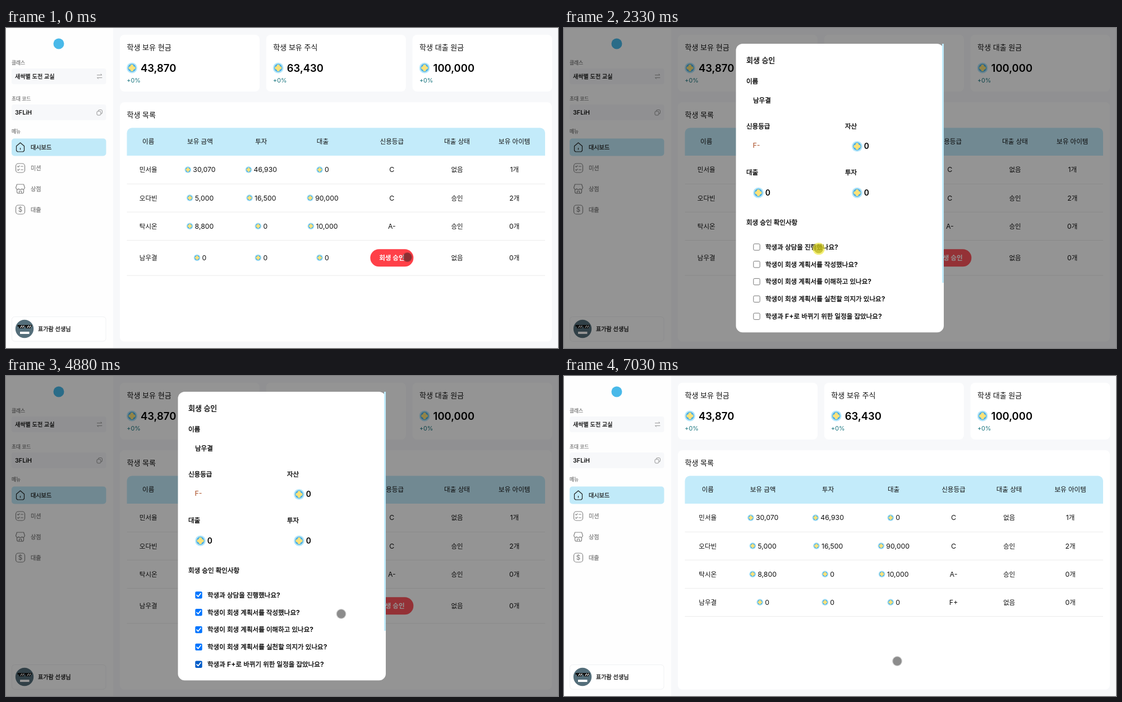
Animation, 984 px wide and 569 px high, one loop 7300 ms. Source, as an HTML page with a canvas:

```html
<!DOCTYPE html>
<html lang="ko">
<head>
<meta charset="utf-8">
<title>학생 대시보드</title>
<style>
html, body { margin: 0; width: 100%; height: 100%; overflow: hidden; background: #f7f8fa; }
canvas { display: block; width: 984px; height: 569px; }
</style>
</head>
<body>
<canvas id="stage"></canvas>
<script>
const W = 984, H = 569, LOOP = 7300, STEP = 200 / 3;
const canvas = document.getElementById('stage');
const ctx = canvas.getContext('2d');
const dpr = window.devicePixelRatio || 1;
canvas.width = W * dpr;
canvas.height = H * dpr;

const SKY = '#c3ebfa', INK = '#111', GRAY = '#858585', PALE = '#f7f8fa';

// Moments of the story, counted in steps
const OPEN = 18, FIRST_CHECK = 36, CHECK_GAP = 8, SCROLL = 75, CLOSE = 95;

// ---------- helpers ----------
const clamp = p => Math.min(1, Math.max(0, p));
const ease = p => p * p * (3 - 2 * p);

function box(x, y, w, h, r, fill, stroke, line = 1) {
  ctx.beginPath();
  ctx.roundRect(x, y, w, h, r);
  if (fill) { ctx.fillStyle = fill; ctx.fill(); }
  if (stroke) { ctx.strokeStyle = stroke; ctx.lineWidth = line; ctx.stroke(); }
}

function disc(x, y, r, fill) {
  ctx.beginPath();
  ctx.arc(x, y, r, 0, Math.PI * 2);
  ctx.fillStyle = fill;
  ctx.fill();
}

function strokePath(x, y, d, color, width) {
  ctx.save();
  ctx.translate(x, y);
  ctx.strokeStyle = color;
  ctx.lineWidth = width;
  ctx.lineCap = ctx.lineJoin = 'round';
  ctx.stroke(new Path2D(d));
  ctx.restore();
}

// Hangul is set slightly smaller than Latin so both look even.
const isHangul = run => /[가-힣]/.test(run);
const runsOf = s => s.match(/[가-힣]+|[^가-힣]+/g);

function setFont(run, size, weight) {
  ctx.font = isHangul(run)
    ? `${weight === 600 ? 500 : weight} ${size * 0.94}px "Noto Sans CJK KR", "Noto Sans CJK", sans-serif`
    : `${weight} ${size}px Inter, "Noto Sans", sans-serif`;
}

function widthOf(s, size = 12.3, weight = 400) {
  return runsOf(s).reduce((sum, run) => {
    setFont(run, size, weight);
    return sum + ctx.measureText(run).width;
  }, 0);
}

// y is the visual middle of the line
function text(s, x, y, size = 12.3, weight = 400, color = INK, centered = false) {
  if (centered) x -= widthOf(s, size, weight) / 2;
  ctx.fillStyle = ctx.strokeStyle = color;
  ctx.lineWidth = size * 0.025;
  for (const run of runsOf(s)) {
    setFont(run, size, weight);
    ctx.fillText(run, x, y + size * 0.36);
    // thin outline: a semibold between the installed weights
    if (weight === 600 && isHangul(run)) ctx.strokeText(run, x, y + size * 0.36);
    x += ctx.measureText(run).width;
  }
}

function coin(x, y, r) {
  disc(x, y, r, '#b6e7f9');
  disc(x, y, r * 0.76, '#4aaee6');
  ctx.save();
  ctx.translate(x, y);
  ctx.fillStyle = '#fbe27a';
  const a = r * 0.62, b = r * 0.27;
  box(-a, -b, a * 2, b * 2, b * 0.7, '#fbe27a');
  box(-b, -a, b * 2, a * 2, b * 0.7, '#fbe27a');
  ctx.rotate(Math.PI / 4);
  box(-a * 0.7, -a * 0.7, a * 1.4, a * 1.4, 0, '#fbe27a');
  ctx.restore();
}

// ---------- page ----------
const ICONS = [
  'M-7-2L0-8L7-2V6L5 8H-5L-7 6ZM0 1.5V4',
  'M-5-3l1.2 1.2L-1.5-4M-5 3l1.2 1.2L-1.5 2M1-3H5M1 3H5',
  'M-6 1V5Q-6 8-3 8H3Q6 8 6 5V1M-6-8H6L8-2Q6 3 3 0Q0 3-3 0Q-6 3-8-2ZM-2 8V4H2V8',
  ''
];
const MENU = ['대시보드', '미션', '상점', '대출'];

function field(title, value, y) {
  text(title, 10, y - 24.5, 9.23, 600, '#777');
  box(10, y - 14, 168.5, 28, 4, PALE);
  text(value, 16, y, 10.77, 600);
}

function sidebar() {
  box(0, 0, 191, H, 0, '#fefefe');
  disc(94, 28, 9.5, '#49b9e9');
  field('클래스', '새싹별 도전 교실', 86);
  field('초대 코드', '3FLiH', 150);
  strokePath(167, 86, 'M-4.5-2.3H4l-2-2M4 2.3H-4.5l2 2', '#888', 0.9);
  box(164.5, 145.5, 7, 7, 2, null, '#888', 0.9);
  box(162, 148, 7, 7, 2, PALE, '#888', 0.9);

  text('메뉴', 10, 183.5, 9.23, 600, '#777');
  box(10, 196.5, 168.5, 31, 5, '#c1eaf9');
  MENU.forEach((s, i) => {
    const y = 212 + 37 * i, color = i ? GRAY : '#222';
    text(s, 44, y, 10.77, 600, color);
    if (i % 2) box(17.5, y - 8, 16, 16, 4.5, null, color, 1.2);
    strokePath(25.5, y, ICONS[i], color, 1.2);
  });
  text('$', 25.5, 323, 11.5, 500, GRAY, true);

  box(10.5, 513.5, 167.5, 43.5, 5, '#fff', '#f0f1f3');
  disc(33, 535, 16.2, '#546e7a');
  box(20.5, 528, 25.5, 3, 0, '#111');
  for (const x of [23, 35]) {
    box(x, 529, 9, 5, 1, '#111');
    strokePath(x + 3, 532.5, 'M0 0l2.5-3M3.5 0l2.5-3', '#eee', 1.2);
  }
  box(25, 540, 16.5, 4, 0.5, '#fff');
  text('표가람 선생님', 57, 535, 10.77, 600);
}

const TOTALS = [
  ['학생 보유 현금', '43,870'],
  ['학생 보유 주식', '63,430'],
  ['학생 대출 원금', '100,000']
];
const HEADS = ['이름', '보유 금액', '투자', '대출', '신용등급', '대출 상태', '보유 아이템'];
const ROWS = [
  ['민서율', '30,070', '46,930', '0', 'C', '없음', '1개'],
  ['오다빈', '5,000', '16,500', '90,000', 'C', '승인', '2개'],
  ['탁시온', '8,800', '0', '10,000', 'A-', '승인', '0개'],
  ['남우결', '0', '0', '0', 'F+', '없음', '0개']
];
const LEFT = 215.5, TABLE_W = 745.5, COIN_W = 15, PILL_W = 77;
const isMoney = c => c > 0 && c < 4;

// Columns share the table in proportion to their widest cell plus padding.
function columnCenters(approved) {
  const widths = HEADS.map((head, c) => {
    const cells = ROWS.map(row => widthOf(row[c]) + (isMoney(c) ? COIN_W : 0));
    if (c === 4 && !approved) cells.push(PILL_W);
    return Math.max(widthOf(head, 12.3, 500), ...cells) + 25;
  });
  const scale = TABLE_W / widths.reduce((a, b) => a + b);
  let x = LEFT;
  return widths.map(w => (x += w * scale) - w * scale / 2);
}

function money(s, cx, y) {
  const x = cx - (widthOf(s) + COIN_W) / 2;
  coin(x + 6, y, 6);
  text(s, x + COIN_W, y);
}

function table(approved, hovered) {
  const cols = columnCenters(approved);
  box(203, 132, 770, 425.5, 8, '#fff');
  text('학생 목록', LEFT, 154.5, 13.85, 500);
  box(LEFT, 177.5, TABLE_W, 49.5, [9, 9, 0, 0], SKY);
  HEADS.forEach((s, i) => text(s, cols[i], 202, 12.3, 500, INK, true));
  ROWS.forEach((row, r) => {
    const pending = r === 3 && !approved;
    const extra = pending ? 6.2 : 0;
    const y = 252 + 50.1 * r + extra;
    row.forEach((s, c) => {
      if (isMoney(c)) money(s, cols[c], y);
      else if (c === 4 && pending) {
        box(cols[c] - PILL_W / 2, y - 15.3, PILL_W, 31, 15.5, hovered ? '#ff4048' : '#ff545c');
        text('회생 승인', cols[c], y, 12.3, 700, '#fff', true);
      } else text(s, cols[c], y, 12.3, 400, INK, true);
    });
    box(LEFT, y + 24.7 + extra, TABLE_W, 1, 0, '#ebebeb');
  });
}

function page(approved, hovered) {
  box(0, 0, W, H, 0, PALE);
  sidebar();
  TOTALS.forEach(([title, sum], i) => {
    const x = 203 + 260.8 * i;
    box(x, 12, 249, 101, 8, '#fff');
    text(title, x + 12.5, 34.5, 13.85, 500);
    coin(x + 21.5, 71, 9.5);
    text(sum, x + 37, 71, 18.46, 600, '#000');
    text('+0%', x + 12.3, 93, 10.77, 400, '#14727c');
  });
  table(approved, hovered);
}

// ---------- dialog ----------
const QUESTIONS = [
  '학생과 상담을 진행했나요?',
  '학생이 회생 계획서를 작성했나요?',
  '학생이 회생 계획서를 이해하고 있나요?',
  '학생이 회생 계획서를 실천할 의지가 있나요?',
  '학생과 F+로 바뀌기 위한 일정을 잡았나요?'
];

function checkbox(x, y, on, focused) {
  if (!on) return box(x - 5.7, y - 5.7, 11.4, 11.4, 2, '#fff', '#767676');
  box(x - 6.2, y - 6.2, 12.4, 12.4, 2, focused ? '#005cc8' : '#0075ff');
  strokePath(x, y, 'M-3.4 .2L-1 2.7L3.5-2.9', '#fff', 1.8);
}

function dialog(k) {
  const scroll = 107 * ease(clamp((k - SCROLL) / 3.82));
  const bold = (s, x, y, size = 12.3) => text(s, x, y, size, 600, '#000');
  const asset = (title, x, y) => {
    bold(title, x, y);
    coin(x + 21.5, y + 36, 9.5);
    bold('0', x + 33.7, y + 36, 13.85);
  };
  const button = (s, x, y, w, fill) => {
    box(x, y, w, 31, 15.5, fill);
    text(s, x + w / 2, y + 15.3, 12.3, 600, '#000', true);
  };

  box(0, 0, W, H, 0, 'rgba(0,0,0,.42)');
  ctx.save();
  box(306.5, 28, 370.5, 513.2, 12, '#fff');
  ctx.clip();
  ctx.translate(0, -scroll);
  bold('회생 승인', 325, 57, 13.85);
  bold('이름', 325, 94.5);
  bold(ROWS[3][0], 337, 128.3);
  bold('신용등급', 325, 174.5);
  text('F-', 336.5, 209, 12.3, 500, scroll ? '#d8933b' : '#b5633f');
  asset('자산', 501, 174.5);
  asset('대출', 325, 257);
  asset('투자', 501, 257);
  bold('회생 승인 확인사항', 325, 345.8);
  QUESTIONS.forEach((q, i) => {
    const y = 389.3 + 30.8 * i;
    const age = k - FIRST_CHECK - CHECK_GAP * i;
    checkbox(343.5, y + 0.2, age >= 0, age < CHECK_GAP * 2 && (i === 4 || age < CHECK_GAP));
    bold(q, 359, y);
  });
  button('모두 해제', 325, 559, 333.5, '#eeeeee');
  button('취소하기', 325, 599, 162, '#eeeeee');
  button('승인하기', 496.5, 599, 162, SKY);
  ctx.restore();
  if (k < 87) box(674, 28 + scroll * 0.828, 3, 425, 0, '#bfeafa');
}

// ---------- pointer ----------
// Each stop is reached with a short glide; a click follows three steps later.
const STOPS = [
  { at: 13, x: 715.5, y: 407.5, click: true },
  ...QUESTIONS.map((_, i) => ({
    at: FIRST_CHECK - 4 + CHECK_GAP * i, x: 454 - 5 * i, y: 392.5 + 30 * i, click: true
  })),
  { at: 73, x: 597.5, y: 423 },
  { at: 78, x: 587.5, y: 458 },
  { at: 83, x: 591, y: 536 },
  { at: 88, x: 594, y: 507, click: true }
];

function pointer(k) {
  let { x, y } = STOPS[0];
  for (const stop of STOPS) {
    const p = ease(clamp((k - stop.at + 5) / 5));
    x += (stop.x - x) * p;
    y += (stop.y - y) * p;
  }
  const pressed = STOPS.some(s => s.click && k >= s.at + 3 && k < s.at + 5);
  if (pressed) {
    disc(x, y, 10.8, 'rgba(238,232,50,.65)');
    disc(x, y, 8, 'rgba(165,160,0,.55)');
  } else {
    disc(x, y, 9, 'rgba(40,40,40,.22)');
    disc(x, y, 7.7, 'rgba(30,30,30,.38)');
  }
}

function draw(now) {
  const t = now % LOOP;
  const k = Math.max(0, Math.floor((t + (t < 4400 ? 7 : -13)) / STEP));
  const open = k >= OPEN && k < CLOSE;
  ctx.setTransform(dpr, 0, 0, dpr, 0, 0);
  page(k >= CLOSE, !open);
  if (open) dialog(k);
  pointer(k);
}

let start;
function tick(now) {
  start ??= now;
  draw(now - start);
  requestAnimationFrame(tick);
}
draw(0);
requestAnimationFrame(tick);
</script>
</body>
</html>
```
